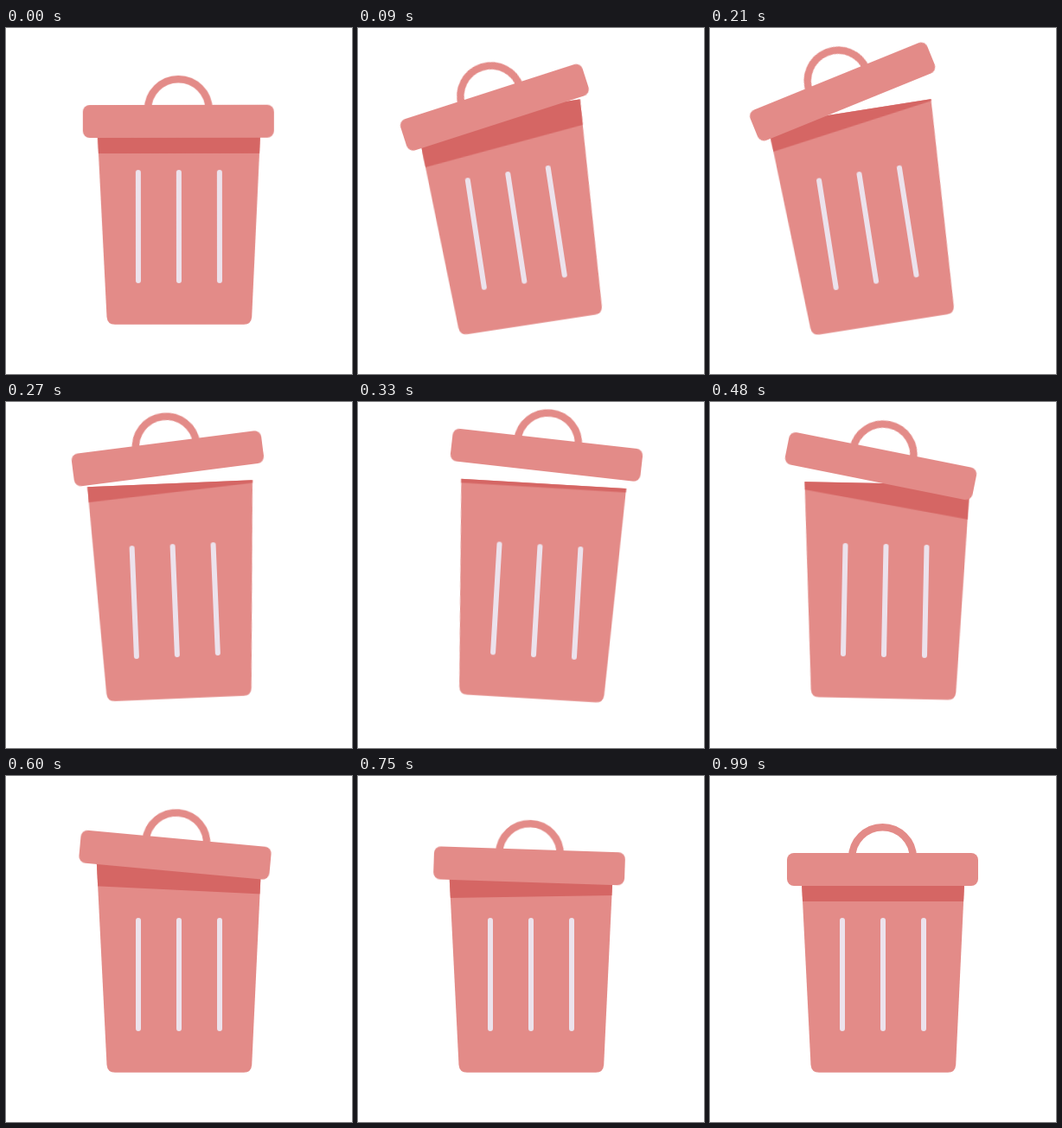
An HTML page without scripts for the animation above (3.02 s loop, 400x400 px).

```html
<!DOCTYPE html>
<html lang="en">
<head>
<meta charset="utf-8">
<title>Trash can</title>
<style>
  html, body { margin: 0; height: 100%; overflow: hidden; background: #fff; }
  svg { display: block; width: 100vw; height: 100vh; }

  .can, .lid, .shade { animation: 3020ms infinite; }
  .can { transform-origin: 200px 343px; animation-name: sway; }
  .lid { transform-origin: 199.5px 108px; animation-name: hop; }
  .shade { transform-origin: 200px 145px; animation-name: shade; }

  .pink { fill: #e38b88; }
  .shade { fill: #d56664; }
  .handle { fill: none; stroke: #e38b88; stroke-width: 8.5; }
  .ribs { stroke: #ece2ec; stroke-width: 6; stroke-linecap: round; }

  @keyframes sway {
    0% { transform: rotate(0deg); animation-timing-function: cubic-bezier(.35, .15, .6, .95); }
    2.98% { transform: rotate(-8.7deg); animation-timing-function: ease-out; }
    4.967% { transform: rotate(-9.2deg); animation-timing-function: ease-in; }
    6.954% { transform: rotate(-9deg); animation-timing-function: cubic-bezier(.4, .1, .6, .95); }
    10.927% { transform: rotate(3.4deg); animation-timing-function: cubic-bezier(.35, .15, .7, .8); }
    15.894% { transform: rotate(1.15deg); animation-timing-function: ease-out; }
    19.868%, 100% { transform: rotate(0deg); }
  }

  @keyframes hop {
    0% { transform: translate(0, 0) rotate(0deg); animation-timing-function: cubic-bezier(.4, .2, .7, .75); }
    2.98% { transform: translate(-3px, -19.5px) rotate(-9.1deg); animation-timing-function: cubic-bezier(.3, .5, .65, 1); }
    6.954% { transform: translate(-3.7px, -38.5px) rotate(-13.2deg); animation-timing-function: cubic-bezier(.4, .1, .6, .9); }
    10.927% { transform: translate(1.8px, -47.3px) rotate(3deg); animation-timing-function: cubic-bezier(.4, .2, .7, .85); }
    15.894% { transform: translate(-7.4px, -34px) rotate(10.25deg); animation-timing-function: linear; }
    18.874% { transform: translate(-4.9px, -21.4px) rotate(6.5deg); animation-timing-function: cubic-bezier(.3, .5, .65, .9); }
    24.834% { transform: translate(-1.5px, -4.2px) rotate(1.9deg); animation-timing-function: ease-out; }
    32.781%, 100% { transform: translate(0, 0) rotate(0deg); }
  }

  @keyframes shade {
    0% { transform: translateY(0) skewY(0deg); animation-timing-function: cubic-bezier(.4, .2, .7, .75); }
    2.98% { transform: translateY(-10.5px) skewY(-6.4deg); animation-timing-function: cubic-bezier(.3, .4, .65, .95); }
    6.954% { transform: translateY(-34px) skewY(-8.9deg); animation-timing-function: cubic-bezier(.4, .1, .6, .9); }
    10.927% { transform: translateY(-46.5px) skewY(0deg); animation-timing-function: cubic-bezier(.4, .2, .7, .85); }
    15.894% { transform: translateY(-26.5px) skewY(9.3deg); animation-timing-function: cubic-bezier(.25, .4, .6, .95); }
    24.834% { transform: translateY(-5.5px) skewY(-.9deg); animation-timing-function: ease-out; }
    32.781%, 100% { transform: translateY(0) skewY(0deg); }
  }
</style>
</head>
<body>
<svg viewBox="0 0 400 400">
  <defs>
    <path id="tub" d="M104.5 94H295.5L284.2 334Q283.6 342.7 275 342.7H126Q117.2 342.7 116.5 334Z"/>
    <clipPath id="inside"><use href="#tub"/></clipPath>
  </defs>
  <g class="can">
    <use href="#tub" class="pink"/>
    <g clip-path="url(#inside)">
      <rect class="shade" x="90" y="20" width="220" height="125"/>
    </g>
    <path class="ribs" d="M153 167V292M200 167V292M247 167V292"/>
    <g class="lid">
      <path class="handle" d="M164.2 94.5a35.3 35.3 0 0 1 70.6 0"/>
      <rect class="pink" x="89" y="89" width="221" height="38" rx="8"/>
    </g>
  </g>
</svg>
</body>
</html>
```
